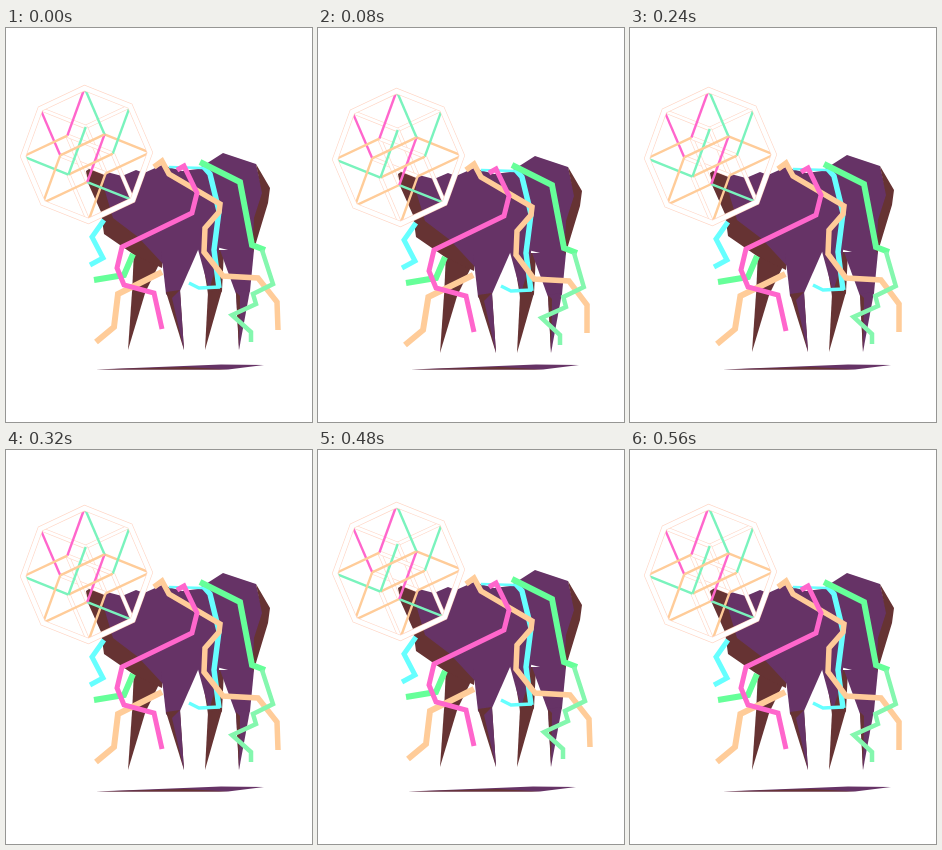
Write an HTML page with a canvas that moves like this. It is 306 px wide and 394 px high and loops after 0.64 s.

```html
<!DOCTYPE html>
<html lang="en">
<head>
<meta charset="utf-8">
<title>Walking creature</title>
<style>
  html, body { margin: 0; width: 100%; height: 100%; overflow: hidden; background: #fff; }
  canvas { display: block; width: 306px; height: 394px; }
</style>
</head>
<body>
<canvas width="306" height="394"></canvas>
<script>
const ctx = document.querySelector('canvas').getContext('2d');
const STEP = 80, STEPS = 8;

const PURPLE = '#663366', BROWN = '#663333', WHITE = '#fff', PALE = '#ffd5c4';
const PINK = '#ff66cc', MINT = '#66ff99', CYAN = '#66ffff', PEACH = '#ffcc99';
const PALE_MINT = '#84f7ae', AQUA = '#7af3bd';

let swing = 0; // sideways pull on loose ribbon ends

function trace(points, pull = 0) {
  ctx.beginPath();
  for (const pair of points.split(' ')) {
    const [x, y] = pair.split(',').map(Number);
    const depth = Math.min(1, Math.max(0, (y - 225) / 75));
    ctx.lineTo(x - pull * depth, y);
  }
}

function shape(color, points) {
  trace(points);
  ctx.fillStyle = color;
  ctx.fill();
}

function ribbon(color, width, points, pull = 0) {
  trace(points, pull);
  ctx.strokeStyle = color;
  ctx.lineWidth = width;
  ctx.stroke();
}

// A thigh narrowing to the knee and a shin running to a point.
function leg(thigh, shin, hipLeft, hipRight, knee, foot) {
  const left = knee - 7, right = knee + 7;
  shape(thigh, `${hipLeft},222 ${hipRight},222 ${right},263 ${knee},274 ${left},266`);
  shape(shin, `${left},264 ${right},262 ${foot},322`);
}

function creature() {
  leg(BROWN, BROWN, 128, 160, 133, 122);
  leg(BROWN, BROWN, 195, 218, 209, 199);
  shape(PURPLE, '190,214 214,214 211,236 203,262');
  shape(BROWN, '80,143 86,139 97,143 130,190 158,220 156,240 127,226 98,206 95,184 82,155');
  shape(PURPLE, '97,143 116,148 130,142 138,145 156,137 176,143 192,141 217,125 250,136 ' +
    '257,165 246,228 214,220 200,215 174,237 158,237 132,209 107,190 98,160');
  shape(BROWN, '250,136 264,160 262,175 246,228 248,190 256,165');
  leg(PURPLE, BROWN, 155, 192, 167, 178);
  shape(PURPLE, '166,270 174,262 178,322');
  leg(PURPLE, PURPLE, 214, 248, 237, 233);
  shape(BROWN, '230,264 234,268 233,322');
}

function ribbons() {
  ribbon(CYAN, 5, '98,192 86,209 97,230 84,237');
  ribbon(MINT, 6, '127,226 118,247 88,252');
  ribbon(PEACH, 6, '156,244 112,266 108,299 90,314', swing);
  ribbon(CYAN, 2.5, '163,139 197,140');
  ribbon(CYAN, 5.5, '197,138 204,146 213,183 208,222 213,260');
  ribbon(CYAN, 3.5, '214,259 193,260 183,255');
  ribbon(PEACH, 5.5, '148,139 156,133 163,146 214,176 213,184 199,200 198,224 217,248 252,250 271,274 272,302', swing);
  ribbon(PINK, 5, '171,142 178,138 191,165 186,185 116,219 111,240 118,257 148,265 156,301');
  ribbon(MINT, 6, '194,134 234,154 246,217 259,222');
  ribbon(PALE_MINT, 4.5, '256,222 267,256 247,266 250,276 226,287 245,304 245,314', swing);
}

// Tesseract seen along its symmetry axis: two octagons of vertices.
function ring() {
  const vertex = (i, size) => {
    const angle = (i * 45 - 91.7) * Math.PI / 180;
    return `${80.5 + 63.5 * size * Math.cos(angle)},${126.5 + 66.5 * size * Math.sin(angle)}`;
  };
  const outer = i => vertex(i, 1), inner = i => vertex(i, Math.SQRT2 - 1);
  const outlined = (points, width) => {
    ribbon(PALE, width + 1.2, points);
    ribbon(WHITE, width, points);
  };
  const palette = { P: PINK, M: AQUA, O: PEACH };
  // one letter per vertex, a dot for a white bar
  const families = [
    ['P.O.OOMP', outer, inner, 7],
    ['MMOM.OO.', outer, inner, 1],
    ['.PO..MO.', inner, inner, 3]
  ];
  const bars = families.flatMap(([letters, from, to, skip]) =>
    [...letters].map((letter, i) => [palette[letter], `${from(i)} ${to(i + skip)}`]));
  bars.filter(([color]) => !color).forEach(([, points]) => outlined(points, 3));
  bars.filter(([color]) => color).forEach(([color, points]) => ribbon(color, 2.4, points));

  const rim = Array.from({ length: 8 }, (_, i) => outer(i));
  outlined([...rim, ...rim.slice(0, 2)].join(' '), 4.6);
}

// Five steps of easing up the range, three of even return.
function bob(step, ease) {
  const phase = (step + 3) % STEPS;
  const level = phase <= 5 ? (phase / 5) ** ease : (STEPS - phase) / 3;
  return Math.round(12 * level - 6);
}

function at(x, y, paint) {
  ctx.save();
  ctx.translate(x, y);
  paint();
  ctx.restore();
}

function draw(step) {
  swing = step % 2 * 3;
  ctx.fillStyle = WHITE;
  ctx.fillRect(0, 0, 306, 394);
  at(swing, 0, () => {
    shape(PURPLE, '90,341.5 215,336.5 258,337 222,341.5');
    shape(BROWN, '90,341.5 180,339 222,341.5');
  });
  at(0, bob(step, 1.3), () => {
    creature();
    ribbons();
  });
  at(0, bob(step, 1.5), ring);
}

const start = performance.now();
function tick() {
  const elapsed = performance.now() - start;
  draw(Math.floor(elapsed / STEP) % STEPS);
  requestAnimationFrame(tick);
}
tick();
</script>
</body>
</html>
```
